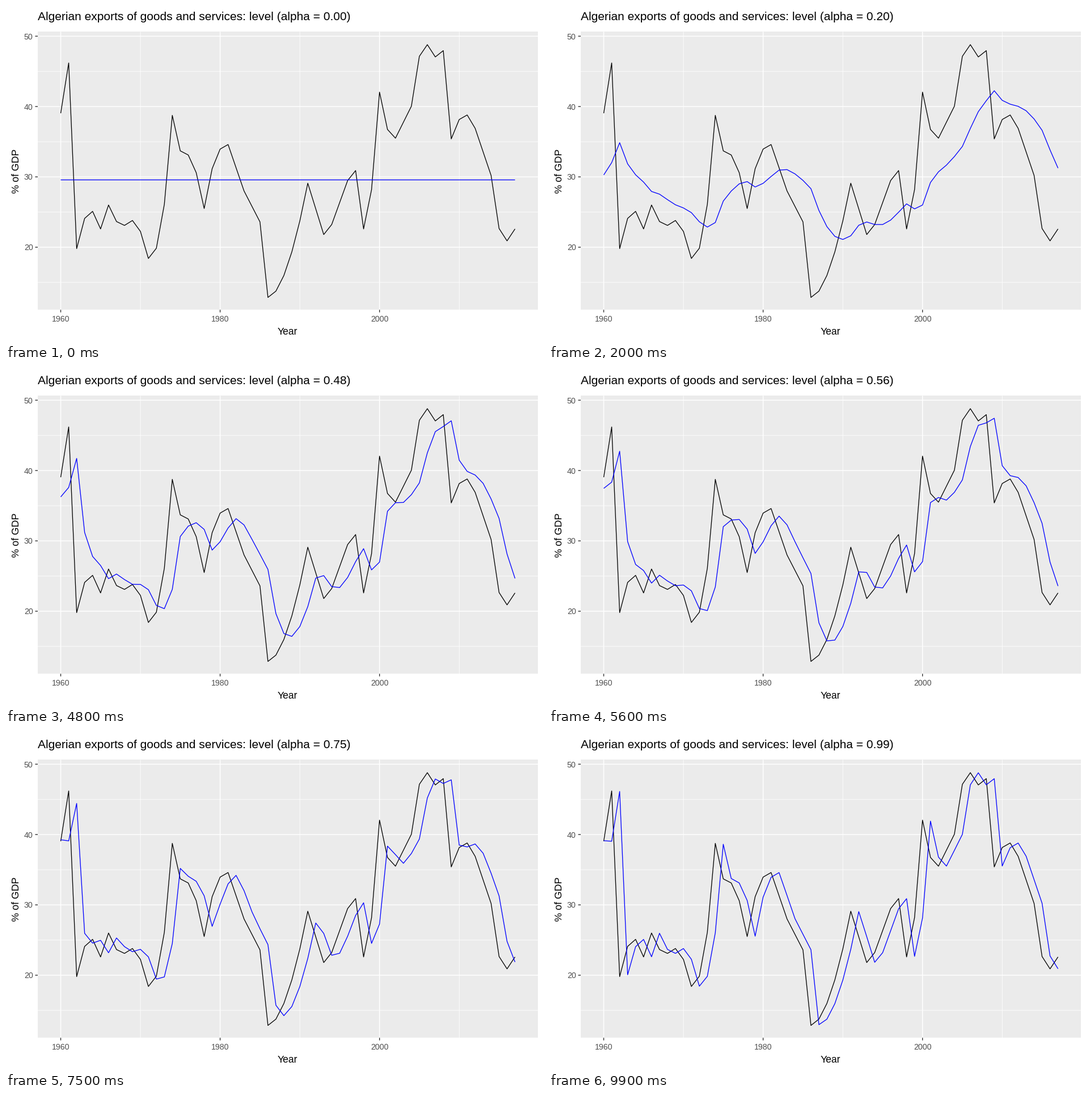
Recreate the animation shown at these times as a matplotlib script. Size 947x592 px, loop 10 s.

```python
import numpy as np
import matplotlib.pyplot as plt
from matplotlib.animation import FuncAnimation
from matplotlib.patches import Rectangle

plt.rcParams.update({"font.family": "Liberation Sans",
                     "text.hinting": "native",
                     "path.simplify": False})

W, H, DPI = 947, 592, 64
PT = 72 / DPI  # points per pixel
FRAMES, INTERVAL = 100, 100
LEFT, RIGHT, TOP, BOTTOM = 56, 938, 45.3, 535.2
TICK = 4.6
GREY = "#4D4D4D"


def line(x):
    return x


def smooth_step(x):
    return x * x * (3 - 2 * x)


def gentle_in(x):
    return x ** 1.8


def ease_in(x):
    return x ** 2.4


def ease_out(x):
    return 1 - (1 - x) ** 2.4


def trace(start, legs):
    """Yearly series through key values: each leg is (value, years, ease)."""
    out = [start]
    for value, years, ease in legs:
        x = np.arange(1, years + 1) / years
        out.extend(out[-1] + (value - out[-1]) * ease(x))
    return np.array(out)


def steps(*values):
    return [(v, 1, line) for v in values]


EXPORTS = trace(39.05, [
    *steps(46.2, 19.8), (25.1, 2, ease_out),
    *steps(22.6, 26), (23.1, 2, ease_out),
    *steps(23.8), (18.4, 2, gentle_in), (38.75, 3, ease_in),
    *steps(33.7), (25.5, 3, ease_in), (34.6, 3, ease_out),
    (28, 2, line), (23.6, 2, line),
    *steps(12.86), (29.1, 5, gentle_in), (21.8, 2, line),
    (30.9, 4, smooth_step),
    *steps(22.6), (42.05, 2, gentle_in), (35.5, 2, ease_out),
    (40.05, 2, line), (48.8, 2, ease_out),
    *steps(47.05, 47.95, 35.4), (38.8, 2, ease_out),
    *steps(36.9), (30.2, 2, line), (20.9, 2, ease_out),
    *steps(22.6)])
T = np.arange(len(EXPORTS))


def px(year):
    return 96.5 + (year - 1960) * 14.055


def py(value):
    return 425 - (value - 20) * 12.393


def smooth(alpha):
    """One-step exponential smoothing with the least-squares initial level."""
    base = np.zeros(len(T))
    for t in T[1:]:
        base[t] = alpha * EXPORTS[t - 1] + (1 - alpha) * base[t - 1]
    weight = (1 - alpha) ** T
    level = weight @ (EXPORTS - base) / (weight @ weight)
    return base + level * weight


fig = plt.figure(figsize=(W / DPI, H / DPI), dpi=DPI, facecolor="white")
ax = fig.add_axes([0, 0, 1, 1])
ax.set(xlim=(0, W), ylim=(H, 0))
ax.axis("off")


def stroke(xs, ys, color, width, z):
    return ax.plot(xs, ys, color=color, lw=width * PT, zorder=z, snap=False,
                   solid_capstyle="butt", solid_joinstyle="round")[0]


def row(value, width):
    stroke([LEFT, RIGHT], [py(value)] * 2, "white", width, 1.5)


def column(year, width):
    stroke([px(year)] * 2, [TOP, BOTTOM], "white", width, 1.5)


def label(x, y, text, size, color="black", **kw):
    return ax.text(x, y, text, fontsize=size * PT, color=color,
                   va="baseline", rotation_mode="anchor", **kw)


ax.add_patch(Rectangle((LEFT, TOP), RIGHT - LEFT, BOTTOM - TOP,
                       facecolor="#EBEBEB", lw=0))

for v in range(15, 50, 10):
    row(v, 0.85)
for yr in range(1970, 2011, 20):
    column(yr, 0.85)
for v in range(20, 51, 10):
    row(v, 1.5)
    stroke([LEFT - TICK, LEFT], [py(v)] * 2, "#333333", 1.4, 2)
    label(47.6, py(v) + 5.4, str(v), 14.1, GREY, ha="right")
for yr in range(1960, 2001, 20):
    column(yr, 1.5)
    stroke([px(yr)] * 2, [BOTTOM, BOTTOM + TICK], "#333333", 1.4, 2)
    label(px(yr), 555.6, str(yr), 14.1, GREY, ha="center")

label((LEFT + RIGHT) / 2 - 0.6, 579.2, "Year", 17.6, ha="center")
label(23, 290.5, "% of GDP", 17.6, rotation=90, ha="center")
title = label(56, 25.3, "", 21)

years = px(1960 + T)
stroke(years, py(EXPORTS), "black", 1.3, 3)
fitted = stroke(years, py(EXPORTS), "blue", 1.3, 4)


def update(i):
    alpha = i / FRAMES
    fitted.set_ydata(py(smooth(alpha)))
    title.set_text("Algerian exports of goods and services: "
                   f"level (alpha = {alpha:.2f})")
    return fitted, title


anim = FuncAnimation(fig, update, frames=FRAMES, interval=INTERVAL,
                     repeat=True, repeat_delay=0)
plt.show()
```
